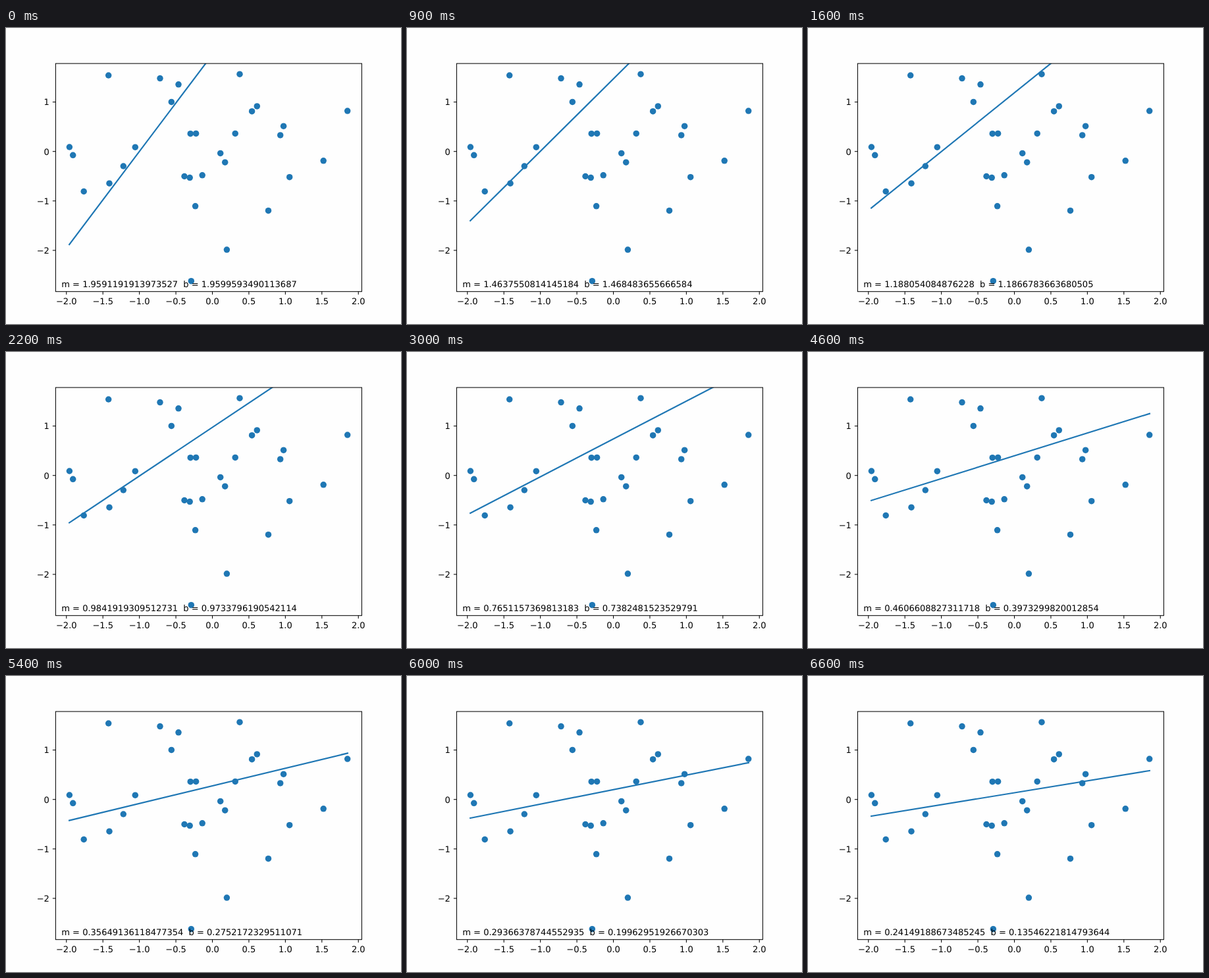
An HTML page for the animation above (6.7 s loop, 600 by 450 pixels).

```html
<!DOCTYPE html>
<html lang="en">
<head>
<meta charset="utf-8">
<title>Line fit by gradient descent</title>
<style>
  html, body { margin: 0; width: 100%; height: 100%; overflow: hidden; background: #fefefe; }
  svg { display: block; width: 600px; height: 450px; }
  text {
    font: 13.02px "DejaVu Sans", sans-serif;
    text-rendering: geometricPrecision;
    white-space: pre;
  }
  .axis { fill: none; stroke: #000; stroke-width: 1.04; }
  .dots { fill: #1f77b4; }
  .fit { stroke: #1f77b4; stroke-width: 2.2; stroke-linecap: square; }
</style>
</head>
<body>
<svg viewBox="0 0 600 450">
  <clipPath id="plot"><rect x="75.4" y="54" width="465" height="346.7"/></clipPath>
  <g class="dots" id="dots"></g>
  <g clip-path="url(#plot)"><line class="fit" id="fit"/></g>
  <g id="axes"><rect class="axis" x="75.4" y="54" width="465" height="346.7"/></g>
  <text id="label" x="84.3" y="393.9"></text>
</svg>
<script>
const FRAME = 100, FRAMES = 67, STEPS_PER_FRAME = 1.5;
const LAST_STEP = Math.round((FRAMES - 1) * STEPS_PER_FRAME);
const LEFT = 96.14, RIGHT = 518.86;
const X0 = 313.5, Y0 = 187.7, XS = 110.87, YS = 75.17;
const px = x => X0 + x * XS;
const py = y => Y0 - y * YS;
const $ = id => document.getElementById(id);

function add(parent, tag, attrs, text) {
  const el = document.createElementNS("http://www.w3.org/2000/svg", tag);
  for (const name in attrs) el.setAttribute(name, attrs[name]);
  if (text) el.textContent = text;
  parent.append(el);
}

// The plotted sample, in stage pixels
const points = [
  [96.4, 181], [101.7, 193.3], [118.2, 248.5], [155.7, 72], [157, 236.2],
  [178.3, 210], [196.3, 181.2], [234, 76.6], [251.3, 112.4], [262, 85.8],
  [271, 225.5], [279.2, 227.6], [280.2, 160.7], [288.6, 160.4], [287.6, 270.8],
  [298.2, 223.8], [281.3, 384.7], [325.7, 190.4], [332.7, 204.2], [335.4, 337.1],
  [348.2, 160.4], [355, 70.2], [373.6, 126.7], [381.3, 118.9], [398.5, 277.7],
  [416.7, 162.9], [421.6, 149.2], [430.7, 226.7], [482.2, 201.8], [518.7, 126.1]
];
for (const [cx, cy] of points) add($("dots"), "circle", { cx, cy, r: 4.75 });

const signed = (v, digits) => v.toFixed(digits).replace("-", "\u2212");
for (let v = -2; v <= 2; v += 0.5) {
  add($("axes"), "path", { class: "axis", d: `M${px(v)} 400.7v4.56` });
  add($("axes"), "text", { x: px(v), y: 419.5, "text-anchor": "middle" }, signed(v, 1));
}
for (let v = -2; v <= 1; v++) {
  add($("axes"), "path", { class: "axis", d: `M75.4 ${py(v)}h-4.56` });
  add($("axes"), "text", { x: 65.9, y: py(v) + 4.9, "text-anchor": "end" }, signed(v, 0));
}

// Exponential approach from the first value to the last
function decay(from, to, rate) {
  const run = step => 1 - Math.exp(-rate * step);
  return step => {
    const f = run(step) / run(LAST_STEP);
    return (1 - f) * from + f * to;
  };
}
const slope = decay(1.9591191913973527, 0.24149188673485245, 0.02065);
const intercept = decay(1.9599593490113687, 0.13546221814793644, 0.0182);

function draw(frame) {
  const step = Math.round(frame * STEPS_PER_FRAME);
  const m = slope(step), b = intercept(step);
  const lineY = x => py(m * (x - X0) / XS + b);
  const ends = { x1: LEFT, y1: lineY(LEFT), x2: RIGHT, y2: lineY(RIGHT) };
  for (const name in ends) $("fit").setAttribute(name, ends[name]);
  $("label").textContent = `m = ${m}  b = ${b}`;
}

let shown = -1;
function tick() {
  const frame = Math.floor(performance.now() / FRAME) % FRAMES;
  if (frame !== shown) draw(shown = frame);
  requestAnimationFrame(tick);
}
tick();
</script>
</body>
</html>
```
